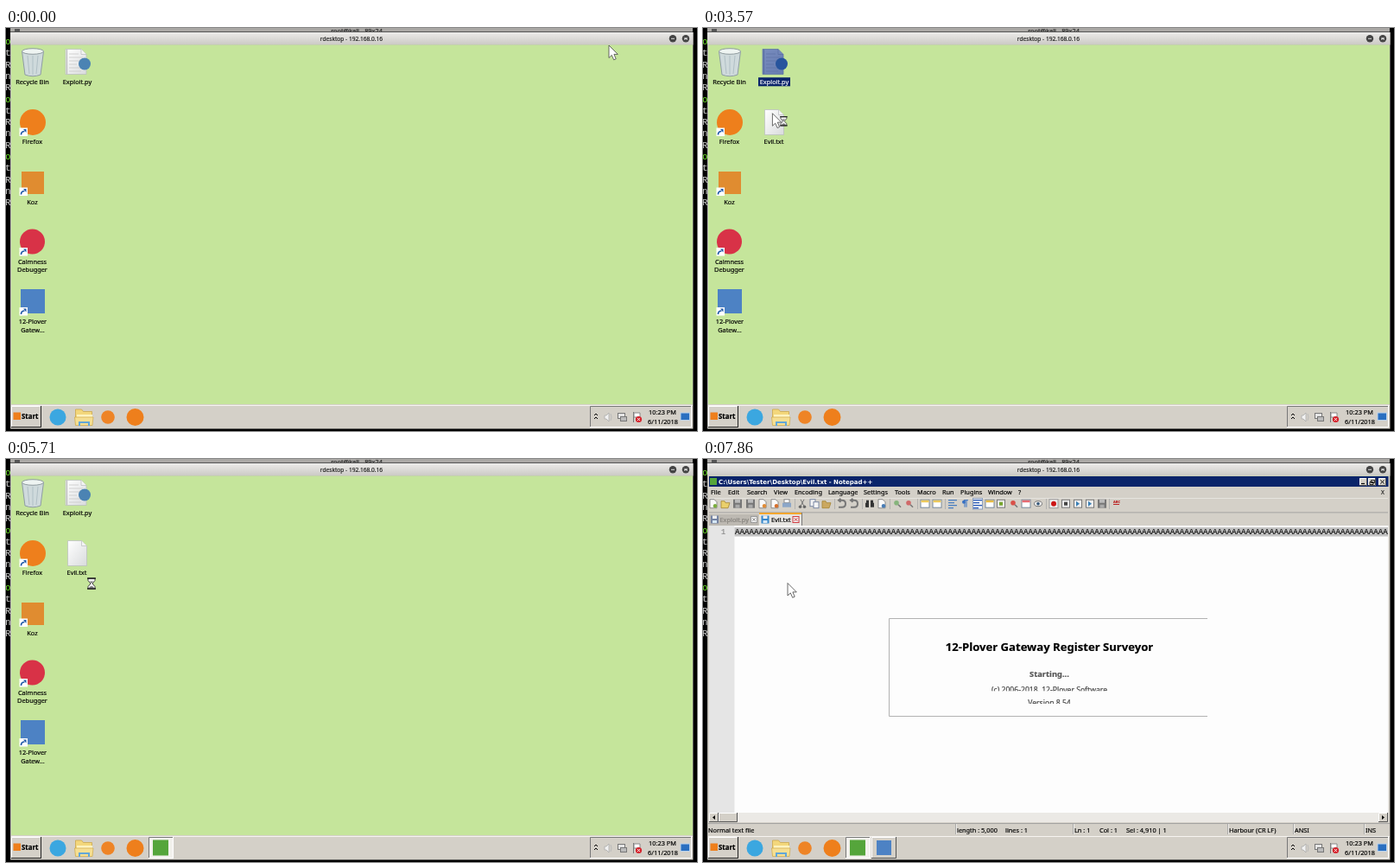
An HTML page that plays this animation: 800x466 px, repeating every 8000 ms.

```html
<!DOCTYPE html>
<html lang="en">
<head>
<meta charset="utf-8">
<title>Remote desktop</title>
<style>
  html, body { margin: 0; width: 100%; height: 100%; overflow: hidden; background: #000; }
  svg { display: block; width: 800px; height: 466px; }
  text { font: 7.35px "Noto Sans", "Open Sans", sans-serif; white-space: pre; stroke-width: .18px; }
  .b { font-weight: bold; }
  .m { font-family: "Liberation Mono", monospace; }
  .t { font: bold 7px "DejaVu Sans", sans-serif; stroke: none; }
</style>
</head>
<body>
<svg id="stage" viewBox="0 0 800 466"></svg>
<script>
const stage = document.getElementById('stage');
const TICK = 1000 / 7, TICKS = 56;
const FACE = '#d4d0c8', NAVY = '#0a246a', SKY = '#c5e59b', ORANGE = '#ee7f1c', BLUE = '#4d82c4', GREEN = '#55a53b';

const rect = (x, y, w, h, fill, extra = '') =>
  `<rect x="${x}" y="${y}" width="${w}" height="${h}" fill="${fill}" ${extra}/>`;
const disc = (x, y, r, fill) => `<circle cx="${x}" cy="${y}" r="${r}" fill="${fill}"/>`;
const path = (d, stroke, fill = 'none', w = 1) =>
  `<path d="${d}" stroke="${stroke}" fill="${fill}" stroke-width="${w}"/>`;
const text = (s, x, y, fill = '#000', extra = '') =>
  `<text x="${x}" y="${y}" fill="${fill}" stroke="${fill}" ${extra}>${s}</text>`;
const mid = (s, x, y, fill, extra = '') => text(s, x, y, fill, 'text-anchor="middle" ' + extra);
const size = n => `style="font-size:${n}px"`;
const at = (x, y, s) => `<g transform="translate(${x} ${y})">${s}</g>`;
const bevel = (x, y, w, h, fill = FACE, up = true) => rect(x, y, w, h, fill) +
  path(`M${x + .5} ${y + h}V${y + .5}H${x + w}`, up ? '#fff' : '#777') +
  path(`M${x + w - .5} ${y}V${y + h - .5}H${x}`, up ? '#555' : '#fff');

const defs = `<defs>
  <linearGradient id="bar" x2="0" y2="1"><stop stop-color="#ecebe9"/><stop offset="1" stop-color="#cbc9c5"/></linearGradient>
  <linearGradient id="page" x2="1" y2="1"><stop stop-color="#fff"/><stop offset="1" stop-color="#d9dbdd"/></linearGradient>
  <filter id="tint" color-interpolation-filters="sRGB"><feColorMatrix
    values=".45 0 0 0 .02 0 .45 0 0 .1 0 0 .45 0 .3 0 0 0 1 0"/></filter>
  <clipPath id="strip"><rect width="800" height="4"/></clipPath>
  <clipPath id="line"><rect x="36" y="77" width="757" height="14"/></clipPath>
  <clipPath id="cut1"><rect x="215" y="255" width="369" height="13.3"/></clipPath>
  <clipPath id="cut2"><rect x="215" y="270" width="369" height="13"/></clipPath>
</defs>`;

function frame() {
  const prompt = 'otRnRotRnRotRnR'.split('').map((c, i) =>
    text(c, -1, 19 + i * 13.3, c == 'o' ? '#6fe02e' : '#bbb', 'class="m" ' + size(11))).join('');
  const button = x => disc(x, 12.3, 4.2, '#444') + path(`M${x - 2} 12.3h4`, '#ddd');
  return rect(0, 0, 800, 466, '#000') + prompt + rect(5, 0, 790, 4, '#aaa8a5') + rect(5, 4, 790, 1, '#555') +
    rect(10, 1, 6, 3, '#555') + `<g clip-path="url(#strip)">${mid('root@kali - 89x24', 406, 6, '#222')}</g>` +
    rect(5, 5, 790.5, 458.5, '#b8b6b2') + rect(5, 5, 790.5, 14.5, 'url(#bar)') +
    mid('rdesktop - 192.168.0.16', 400, 14.7, '#222', size(6.6)) +
    button(772) + button(787) + path('M785.5 10.8l3 3m0-3l-3 3', '#ddd') + rect(6, 19.5, 789, 416, SKY);
}

const link = (x, y) => rect(x, y, 9.5, 9.5, '#fff') +
  path(`M${x + 2} ${y + 8}Q${x + 2} ${y + 4} ${x + 6} ${y + 4}`, '#2058a8', 'none', 1.7) +
  path(`M${x + 4.5} ${y + 1.5}h3.5v4z`, 'none', '#2058a8');

function icon(art, x, y, lines, on) {
  const wide = Math.max(...lines.map(s => s.length)) * 3.7;
  return `<g ${on ? 'filter="url(#tint)"' : ''}>${art}</g>` +
    (on ? rect(x - wide / 2, y - 7.5, wide, lines.length * 9.6 + .5, NAVY) : '') +
    lines.map((s, i) => mid(s, x, y + i * 9.6, on ? '#fff' : '#000')).join('');
}

const bin = path('M18.5 27L22 54Q31 57.5 40 54L43.5 27', '#8e9ca3', '#cfdadc') +
  '<ellipse cx="31" cy="27" rx="12.5" ry="3.3" fill="#eef4f2" stroke="#8f9b9e"/>' +
  path('M25 32l2 21M31 32v22M37 32l-2 21', '#b0bfc5');
const sheet = (x, y, w) => path(`M${x} ${y}h${w - 6}l6 6v23h${-w}z`, '#b9bcbf', 'url(#page)', .7) +
  path(`M${x + w - 6} ${y}v6h6`, '#b9bcbf', '#f4f4f4', .7);
const script = sheet(69, 24.5, 24) + path('M73 30h11M73 34h16M73 38h13M73 42h9M73 46h13M73 50h14', '#ccc', 'none', .9) +
  path('M70.5 25v28', '#bbb', 'none', 1.2) + disc(91, 41.5, 7, '#4b83b3');

function desktop(k) {
  const net = k >= 6 && k < 15;
  return icon(bin, 30.5, 64.7, ['Recycle Bin']) +
    icon(script, 82.5, 64.7, ['Exploit.py'], k >= 15 && k < 26) +
    icon(disc(31, 109, 15, ORANGE) + link(15.5, 115.5), 30.5, 134, ['Firefox']) +
    icon(rect(18, 166, 26, 26, '#e08c30') + link(15.5, 184.5), 30.5, 203.5, ['Koz']) +
    icon(disc(30.5, 247, 14.5, '#d83247') + link(15.5, 254), 30.5, 272.7, ['Calmness', 'Debugger']) +
    icon(rect(17, 302, 28, 28, BLUE) + link(15.5, 323), 31, 342.2,
      net ? ['12-Plover', 'Gateway', 'Register', 'Surveyor'] : ['12-Plover', 'Gatew...'], net) +
    (k >= 21 ? icon(sheet(71.5, 94.5, 22), 82, 134, ['Evil.txt'], k >= 27 && k < 38) : '');
}

function taskbar(k) {
  const folder = path('M80.5 441h7l2 2.5h10v15h-19z', '#c9a33f', '#f3d77c', .7) +
    rect(82, 447, 18, 4, '#fff3bf') + path('M79.5 450h21.5l-1 9.5h-19.5z', '#cda848', '#f6df92', .7) +
    path('M85 460v-4h11v4', '#62a7d8', 'none', 2);
  const tray = bevel(676, 437, 118, 25, FACE, false) + path('M681 448l2-2 2 2m-4 4l2-2 2 2', '#000') +
    path('M693 448h2l3-3v10l-3-3h-2z', '#aaa', '#f2f2f2', .8) + path('M700 446q2 4 0 8', '#bbb') +
    rect(708.5, 445.5, 8, 6, '#e5e5e5', 'stroke="#777"') + rect(711.5, 449.5, 7, 5, '#bbb', 'stroke="#777"') +
    path('M726.5 444v12', '#777') + path('M727 445h7v5h-7z', '#888', '#fff') + disc(732.5, 452.5, 3.6, '#d5222b') +
    path('M731 451l3 3m0-3l-3 3', '#fff', 'none', .9) +
    mid('10:23 PM', 760, 446.7) + mid('6/11/2018', 760.5, 457.8) +
    rect(781, 445, 10.5, 8.5, '#2a6fc0', 'stroke="#bcd4ee"');
  return rect(6, 435, 789, 28, FACE) + rect(6, 436, 789, 1, '#f6f4f0') + bevel(6, 437, 35, 25) +
    path('M40.5 437v24.5H6', '#222') + rect(8.5, 444.5, 8.5, 8.5, ORANGE) +
    text('Start', 18, 452.3, '#000', 'class="b" ' + size(7.9)) +
    disc(60, 450, 9.5, '#3ba7e0') + folder + disc(118, 450, 7.8, '#ee8426') + disc(149.5, 450, 10, ORANGE) +
    (k >= 39 ? bevel(165, 437, 29, 25, '#f3f1ed', false) + rect(170, 440.5, 18, 18, GREEN) : '') +
    (k >= 49 ? bevel(195, 437, 29, 25) + rect(201, 441, 17, 17, BLUE) : '') + tray;
}

// An empty item is a separator, '>' opens a submenu
const ITEMS = ['Open', 'Print', 'Edit', 'Edit with Notepad++', 'Open with>', '', 'Share with>',
  'Restore previous versions', '', 'Send to>', '', 'Cut', 'Copy', '', 'Create shortcut', 'Delete', 'Rename', '', 'Properties'];

function menu(k, my) {
  let y = 104.2, out = bevel(80, 103, 116, 192);
  for (const item of ITEMS) {
    if (!item) {
      out += rect(82, y + 2.6, 112, .8, '#888') + rect(82, y + 3.4, 112, .8, '#fff');
      y += 5.8;
      continue;
    }
    const hot = k > 31 && my >= y && my < y + 11.45, ink = hot ? '#fff' : '#000';
    if (hot) out += rect(82, y, 112, 11.4, NAVY);
    out += text(item.replace('>', ''), 92, y + 8.4, ink, item == 'Open' ? 'class="b"' : '');
    if (item.endsWith('>')) out += path(`M187.5 ${y + 3}l3 2.7-3 2.7z`, 'none', ink);
    if (item.includes('+')) out += rect(83, y + 1.5, 8, 8, GREEN);
    y += 11.45;
  }
  return out;
}

function tool(x, kind, c) {
  const shapes = {
    page: path('M-4-5h5l3 3v7h-8z', '#777', '#fafafa', .8) + disc(2, 2.5, 2.2, c),
    disk: rect(-5, -5, 10, 10, c) + rect(-3, -5, 6, 4, '#bbb') + rect(-2.5, 1, 5, 4, '#aaa'),
    open: path('M-5-3h4l1 2h5l-2 6h-8z', '#a58431', c, .8),
    print: rect(-3, -5, 6, 4, '#fff', 'stroke="#888"') + rect(-5, -1, 10, 5, c),
    cut: path('M-2-5l4 8M2-5l-4 8', '#777') + disc(-2.5, 3.5, 1.8, c) + disc(2.5, 3.5, 1.8, c),
    copy: rect(-5, -5, 6, 8, '#f5f5f5', `stroke="${c}"`) + rect(-1, -2, 6, 7, '#f5f5f5', `stroke="${c}"`),
    turn: path('M-4 4h4q4 0 4-4t-4-4h-4m2.5-2l-2.5 2 2.5 2', c, 'none', 2),
    find: rect(-5, -1, 4, 5, c) + rect(1, -1, 4, 5, c) + rect(-4, -4, 3, 8, c) + rect(1, -4, 3, 4, c),
    zoom: disc(-1, -1, 2.8, c) + path('M1 1l3 3', '#777', 'none', 1.6),
    win: rect(-5, -4.5, 10, 9, '#fff', 'stroke="#789"') + rect(-4.5, -4, 9, 2.5, c),
    rows: path('M-5-4h10M-5-1h7M-5 2h10M-5 5h6', c, 'none', 1.3),
    mark: path('M2-4v8M0-4v8M4-4h-5', c) + disc(-1, -2, 2, c),
    eye: '<ellipse rx="4.5" ry="3" fill="#eee" stroke="#777"/>' + disc(0, 0, 1.8, c),
    dot: rect(-5, -5, 10, 10, '#efefef', 'stroke="#999"') + disc(0, 0, 3, c),
    box: rect(-4.5, -4.5, 9, 9, '#eee', 'stroke="#777"') + rect(-2, -2, 4, 4, c),
    play: rect(-4.5, -4.5, 9, 9, '#eee', 'stroke="#777"') + path('M-2-3l4 3-4 3z', 'none', c)
  };
  return at(x, 51.7, shapes[kind]);
}

const TOOLS = `12 page #7aad3c,26 open #ead06c,40 disk #777,55 disk #777,69 page #e08b35,83 page #d66f2c,97 print #8ba6c8,
115 cut #666,129 copy #7b88a4,143 open #cba85f,161 turn #777,175 turn #777,193 find #333,207 page #477cb5,
225 zoom #86b47c,239 zoom #d06969,257 win #edc95c,271 win #edc95c,289 rows #477dc0,303 mark #3770c3,
318 rows #2455b5,332 win #e7bb44,345 box #77a62f,360 zoom #d95149,374 win #e66b72,388 eye #357,
406 dot #cc1515,420 box #444,434 play #387fb6,448 play #387fb6,462 disk #777`.split(',').map(s => s.trim().split(' '));
const MENUS = 'File 9 Edit 29 Search 51 View 82 Encoding 106 Language 145 Settings 186 Tools 222 Macro 248 Run 277 Plugins 298 Window 330 ? 365'.split(' ');

function editor(k) {
  const picked = k >= 45;
  const divider = x => rect(x, 422, .8, 12, '#888') + rect(x + .8, 422, .8, 12, '#fff');
  const close = (x, c) => rect(x - 3.5, 66.5, 7, 7, '#eee', `stroke="${c}"`) +
    path(`M${x - 1.8} 68.2l3.6 3.6m0-3.6l-3.6 3.6`, c);
  const floppy = (x, c) => at(x, 70, rect(-4.5, -4.5, 9, 9, c) + rect(-2.5, -4.5, 5, 3.5, '#eee') + rect(-2.5, 1, 5, 3, '#d5e7f5'));
  let out = rect(6, 19.5, 789, 416, FACE) + rect(7, 20, 786.5, 12, NAVY) + rect(8, 22, 8, 8, GREEN) +
    text('C:\\Users\\Tester\\Desktop\\Evil.txt - Notepad++', 18, 28.8, '#fff', 'class="t"') +
    bevel(760, 22, 9, 9) + bevel(770, 22, 9, 9) + bevel(782, 22, 9, 9) +
    path('M762 28.5h4', '#000', 'none', 1.2) + path('M773.5 24.5h4v3h-4zM772 26.5h4v3h-4z', '#000', FACE, .8) +
    path('M784.5 24.5l4 4m0-4l-4 4', '#000') + text('X', 785, 41, '#222', size(6.5));
  for (let i = 0; i < MENUS.length; i += 2) out += text(MENUS[i], MENUS[i + 1], 41);
  out += rect(7, 45, 786, .6, '#f4f2ee') + rect(312.5, 45.5, 11, 12.5, '#f2f3f6', 'stroke="#8ca0bf"') +
    TOOLS.map(t => tool(...t)).join('') +
    [106, 152, 184, 216, 248, 280, 397, 470].map(x => rect(x, 46, .8, 12, '#aaa')).join('') +
    text('ABC', 475, 51, '#b22', 'class="b" ' + size(4)) + path('M475 52.5h7', '#b22');
  // Tabs and text area
  out += rect(7, 61.5, 786, .8, '#999') + rect(7, 64, 57.5, 13, '#bdb9b2') + floppy(13.5, '#7584a4') +
    text('Exploit.py', 19.5, 73, '#85827d') + close(59, '#999') +
    rect(65, 62, 49.5, 15, '#e7e5e1') + rect(65, 62, 49.5, 2, '#f3a62e') + path('M114.5 62v15', '#777') +
    floppy(72, '#3587cc') + text('Evil.txt', 79, 73) + close(107.5, '#d23d42') +
    rect(7, 77, 786.5, 332, '#fdfdfd') + rect(7, 77, 29.5, 332, '#e5e5e5') +
    rect(36.5, 79, 756.5, 10.5, picked ? '#c2c2c2' : '#e9e9fc') +
    text('1', 21, 86.6, '#888', 'class="m" ' + size(8.5)) +
    `<g clip-path="url(#line)">${text('A'.repeat(150), 37, 86.8, '#111', 'class="m" ' + size(9.15))}</g>`;
  // Scroll bar and status line
  out += rect(7, 409, 786.5, 11, '#ebe9e5') + bevel(7, 409, 11, 11) + bevel(18, 409, 22, 11) +
    bevel(782, 409, 11, 11) + path('M14 412v5l-3-2.5z', 'none', '#000') + path('M786 412v5l3-2.5z', 'none', '#000') +
    rect(6, 421, 789, .8, '#999') + [292, 428, 607, 683, 765].map(divider).join('');
  const status = [['Normal text file', 6], ['length : 5,000', 294], ['lines : 1', 350], ['Ln : 1', 430], ['Col : 1', 459],
    [picked ? 'Sel : 4,910 | 1' : 'Sel : 0 | 0', 490], ['Harbour (CR LF)', 609], ['ANSI', 685], ['INS', 767]];
  return out + status.map(([s, x]) => text(s, x, 431.5)).join('');
}

function splash() {
  return rect(215, 184, 369, 114, '#fdfdfd') + path('M584 184.5H215.5V297.5H584', '#b2b2b2') +
    mid('12-Plover Gateway Register Surveyor', 401, 222, '#000', 'class="b" ' + size(13.1)) +
    mid('Starting...', 401, 251.5, '#555', 'class="b" ' + size(9.3)) +
    `<g clip-path="url(#cut1)">${mid('(c) 2006-2018, 12-Plover Software', 401, 270, '#444', size(8.6))}</g>` +
    `<g clip-path="url(#cut2)">${mid('Version 8.54', 401, 284.5, '#444', size(8.6))}</g>`;
}

// Pointer stops: tick, x, y
const STOPS = [[0, 698, 20], [6.5, 33, 332], [9, 33, 332], [15, 85.5, 45], [20, 85.5, 45],
  [26, 80, 103], [30, 80, 103], [37, 98, 143.5], [56, 98, 143.5]];

function pointerAt(k) {
  const i = STOPS.findIndex(s => s[0] > k), [t0, x0, y0] = STOPS[i - 1], [t1, x1, y1] = STOPS[i];
  const u = (k - t0) / (t1 - t0), e = u * u * (3 - 2 * u);
  return [x0 + (x1 - x0) * e, y0 + (y1 - y0) * e];
}

const ARROW = path('M0 0V14.5L3.3 11.4L5.7 16.8L8.2 15.7L5.9 10.4H10.3Z', '#444', '#fff', .8);
const GLASS = path('M-4-6h8v2.5L1 0L4 3.5V6h-8V3.5L-1 0L-4-3.5z', '#333', '#f4f4f4', .9) +
  path('M-5-6h10M-5 6h10', '#222', 'none', 1.5) + path('M-2-2.5h4L0 0zM-3 5q3-4 6 0z', 'none', '#777');
const BEAM = path('M-3-5.5h2.3L0-5l.7-.5H3M0-5V5M-3 5.5h2.3L0 5l.7.5H3', '#111');

function pointer(k, x, y) {
  if (k >= 53) return at(x, y, ARROW);
  if (k >= 41) return at(99, 144, BEAM);
  if (k >= 38) return at(99, 144, GLASS);
  const busy = k >= 16 && k < 37;
  return at(x, y, ARROW + (busy ? at(13, 9, `<g transform="scale(.85)">${GLASS}</g>`) : ''));
}

function draw(k) {
  const [x, y] = pointerAt(k);
  stage.innerHTML = defs + frame() + (k >= 41 ? editor(k) : desktop(k)) + taskbar(k) +
    (k >= 29 && k < 38 ? menu(k, y) : '') + (k >= 53 ? splash() : '') + pointer(k, x, y);
}

let shown = -1;
const start = performance.now();
function loop(now) {
  const k = Math.floor((Math.max(0, now - start) + 4) / TICK) % TICKS;
  if (k != shown) draw(shown = k);
  requestAnimationFrame(loop);
}
draw(0);
requestAnimationFrame(loop);
</script>
</body>
</html>
```
